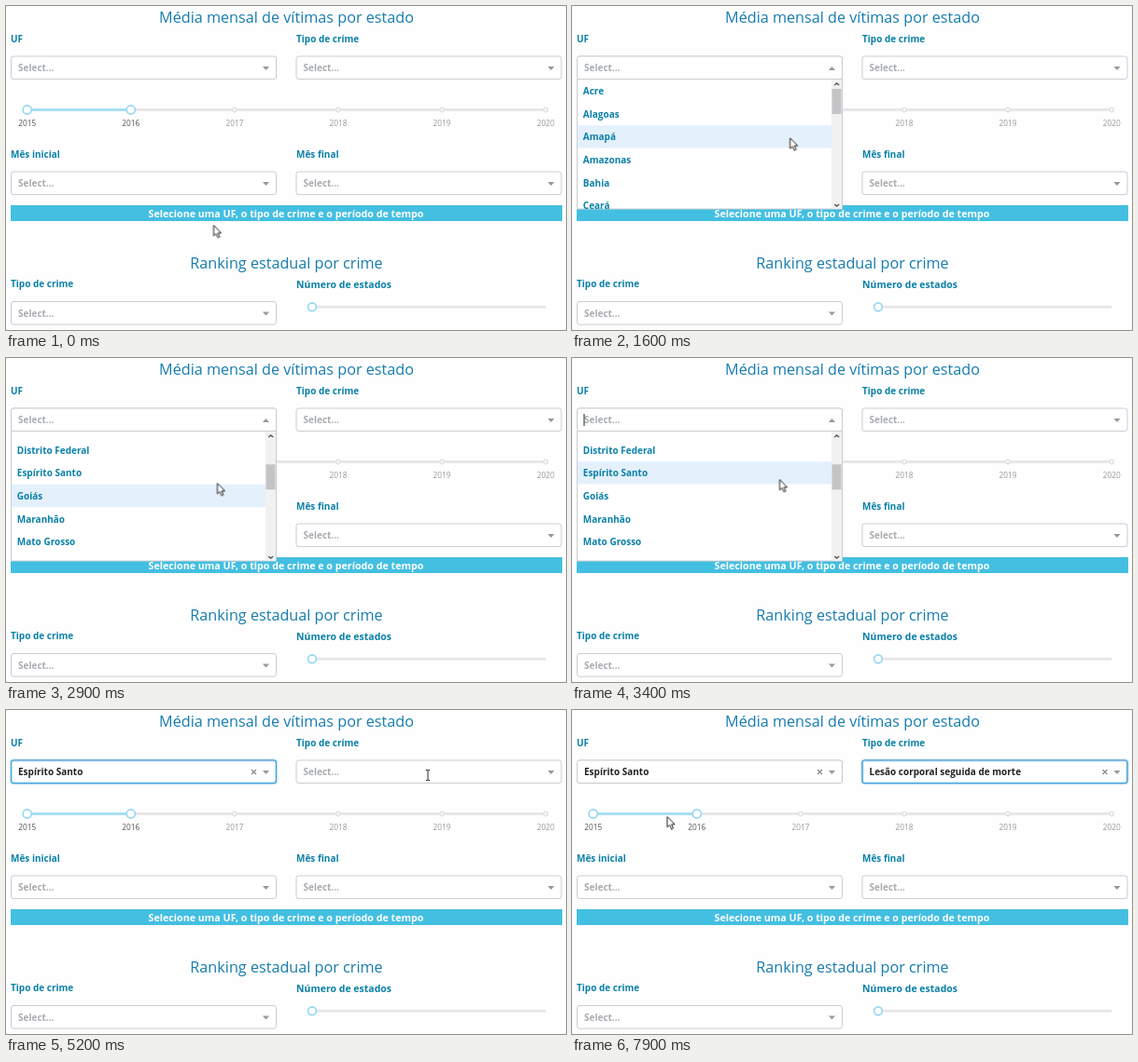
Write an HTML page that moves like this. It is 600x348 px and loops after 8 s.

```html
<!DOCTYPE html>
<html lang="pt-BR">
<head>
<meta charset="utf-8">
<title>Painel de vítimas por estado</title>
<style>
html, body { margin: 0; width: 100%; height: 100%; overflow: hidden; background: #fefefe; }
svg { display: block; width: 600px; height: 348px; }
text { font: 700 10px "Open Sans", "Noto Sans", sans-serif; fill: #0a80a8; }
.title { font-size: 16.2px; font-weight: 500; fill: #167caf; text-anchor: middle; }
.wide { font-size: 10.5px; }
.hint { fill: #a8acb0; }
.value { fill: #222; }
.year { font-size: 8.3px; font-weight: 400; fill: #999; text-anchor: middle; }
.year.on { fill: #555; }
.notice { font-size: 10.7px; fill: #fff; text-anchor: middle; }
.box { fill: #fff; stroke: #c9cdd1; }
.focus { fill: none; stroke: #3c9fdc; stroke-width: 1.2; }
.glow { fill: none; stroke: #3c9fdc; stroke-width: 4; opacity: .17; }
.tri { fill: #999; }
.row { fill: #e4f0fb; }
.rail { fill: #e7e7ea; }
.dot { fill: #fff; stroke: #e3e3e6; stroke-width: 1.6; }
.knob { fill: #fff; stroke: #96d8f2; stroke-width: 1.7; }

.anim { animation: 8s linear infinite; }
.cut { animation: 8s step-end infinite; }
#openL { animation-name: openL; }
#openR { animation-name: openR; }
#doneL { animation-name: doneL; }
#doneR { animation-name: doneR; }
#focusL { animation-name: focusL; }
#rowL { animation-name: rowL; }
#rowR { animation-name: rowR; }
#caretL { animation-name: caretL; }
#caretR { animation-name: caretR; }
#listL { animation-name: scroll; }
#thumb { animation-name: thumb; }
#pointer { animation-name: move; }
#arrow { animation-name: arrow; }
#beam { animation-name: beam; }

@keyframes openL { 0%, 45%, 100% { opacity: 0 } 12.5% { opacity: 1 } }
@keyframes openR { 0%, 81.25%, 100% { opacity: 0 } 65.9% { opacity: 1 } }
@keyframes doneL { 0% { opacity: 0 } 45%, 100% { opacity: 1 } }
@keyframes doneR { 0% { opacity: 0 } 81.25%, 100% { opacity: 1 } }
@keyframes focusL { 0%, 65.9%, 100% { opacity: 0 } 45% { opacity: 1 } }
@keyframes caretL { 0%, 25.75%, 39% { opacity: 1 } 19.1%, 32.4% { opacity: 0 } }
@keyframes caretR { 0%, 79.1% { opacity: 1 } 72.5% { opacity: 0 } }
@keyframes rowL {
  0% { transform: translateY(0) }
  15.25% { transform: translateY(24.6px) }
  18.1% { transform: translateY(49.2px) }
  26.9% { transform: translateY(196.8px) }
  37.5%, 100% { transform: translateY(172.2px) }
}
@keyframes rowR {
  0% { transform: translateY(0) }
  70.75%, 100% { transform: translateY(24.6px) }
}
@keyframes scroll {
  0%, 21.25% { transform: translateY(0) }
  23.1% { transform: translateY(-70px) }
  25% { transform: translateY(-120px) }
  26.25%, 100% { transform: translateY(-140px) }
}
@keyframes thumb {
  0%, 21.25% { transform: translateY(0) }
  23.1% { transform: translateY(12.6px) }
  25% { transform: translateY(21.7px) }
  26.25%, 100% { transform: translateY(25.3px) }
}
@keyframes move {
  0%, 1.25% { transform: translate(222.5px, 235.5px) }
  6.25% { transform: translate(236px, 170px) }
  10% { transform: translate(273px, 73px) }
  12.5% { transform: translate(272px, 78px) }
  17.5% { transform: translate(245px, 125px) }
  21.25% { transform: translate(228px, 150px) }
  25% { transform: translate(227.5px, 150.5px) }
  33.75% { transform: translate(227px, 136px) }
  36.25% { transform: translate(226.5px, 134.5px) }
  38.75% { transform: translate(224px, 132px) }
  42.5%, 43.75% { transform: translate(222.5px, 130.5px) }
  47.5%, 48.75% { transform: translate(300px, 97px) }
  52.5% { transform: translate(334.5px, 90.5px) }
  60%, 61.2% { transform: translate(326.5px, 90.5px) }
  61.25%, 62.5% { transform: translate(470px, 131px) }
  65% { transform: translate(452px, 70px) }
  66.25% { transform: translate(448px, 68px) }
  72.5%, 85% { transform: translate(412.5px, 118.5px) }
  96.25% { transform: translate(120px, 116px) }
  97.5% { transform: translate(104px, 115px) }
  98.75%, 100% { transform: translate(102px, 114.5px) }
}
@keyframes arrow { 0%, 13.5%, 67.5%, 100% { opacity: 1 } 9.5%, 64.1% { opacity: 0 } }
@keyframes beam { 0%, 13.5%, 67.5%, 100% { opacity: 0 } 9.5%, 64.1% { opacity: 1 } }
</style>
</head>
<body>
<svg id="stage" viewBox="0 0 600 348"></svg>
<script>
const LEFT = 5.5, RIGHT = 311, ROW = 24.6;
const states = ["Acre", "Alagoas", "Amapá", "Amazonas", "Bahia", "Ceará", "Distrito Federal",
  "Espírito Santo", "Goiás", "Maranhão", "Mato Grosso", "Mato Grosso do Sul", "Minas Gerais"];
const crimes = ["Homicídio doloso", "Lesão corporal seguida de morte",
  "Roubo seguido de morte (latrocínio)"];

const text = (x, y, s, cls = "") => `<text x="${x}" y="${y}" class="${cls}">${s}</text>`;
const rect = (x, y, w, h, attrs) => `<rect x="${x}" y="${y}" width="${w}" height="${h}" ${attrs}/>`;
const circle = (x, y, r, cls) => `<circle cx="${x}" cy="${y}" r="${r}" class="${cls}"/>`;
const group = (id, kind, body) => `<g id="${id}" class="${kind}">${body}</g>`;
const frame = (x, y, cls) => rect(x, y, 284, 24.6, `rx="2.5" class="${cls}"`);
const tri = (x, y, dir) => `<path class="tri" d="M${x - 3.6} ${y - 2 * dir}h7.2l-3.6 ${4 * dir}z"/>`;

const select = (x, y, label, dir = 1) =>
  frame(x, y, "box") + text(x + 7.5, y + 16.2, label, "hint") + tri(x + 273, y + 13, dir);

const chosen = (x, label) =>
  frame(x, 54, "box") + text(x + 7.5, 70.2, label, "value") + tri(x + 273, 67, 1) +
  `<path d="M${x + 257.5} 64l5 5m0-5l-5 5" stroke="#888" stroke-width="1.2"/>`;

const ring = x => frame(x, 54, "glow") + frame(x, 54, "focus");
const options = (x, list) => list.map((s, i) => text(x + 6.3, 95.2 + ROW * i, s)).join("");
const caret = (id, x) => group(id, "cut", rect(x + 7, 60, 1, 13, 'fill="#222"'));
const menuBox = (x, h) => rect(x, 78.6, 284, h, 'class="box"');
const hover = (id, x) => group(id, "cut", rect(x + .5, 79.1, 283, 24.2, 'class="row"'));
const chevron = (y, d) =>
  `<path d="M281.2 ${y + d}l2.5 ${-2 * d}l2.5 ${2 * d}" fill="none" stroke="#555" stroke-width="1.4"/>`;

function yearSlider() {
  let out = rect(22.5, 110, 556, 3, 'rx="1.5" class="rail"') + rect(22.5, 110, 111.5, 3, 'fill="#a9def2"');
  for (let i = 0; i < 6; i++) {
    const x = 22.7 + 111.1 * i;
    out += i < 2 ? circle(x, 111.5, 4.6, "knob") : circle(x, 111.5, 2.1, "dot");
    out += text(x, 129, 2015 + i, i < 2 ? "year on" : "year");
  }
  return out;
}

const page =
  text(300.5, 18.4, "Média mensal de vítimas por estado", "title") +
  text(5, 38.6, "UF") + text(311, 38.6, "Tipo de crime") +
  select(LEFT, 54, "Select...") + select(RIGHT, 54, "Select...") +
  yearSlider() +
  text(5, 162.8, "Mês inicial") + text(311, 162.8, "Mês final") +
  select(LEFT, 178, "Select...") + select(RIGHT, 178, "Select...") +
  rect(5, 214, 591, 17, 'fill="#43bfe2"') +
  text(300, 226.9, "Selecione uma UF, o tipo de crime e o período de tempo", "notice") +
  text(300.5, 281.6, "Ranking estadual por crime", "title") +
  text(5, 302, "Tipo de crime") + text(311, 302.8, "Número de estados", "wide") +
  select(LEFT, 317.5, "Select...") +
  rect(328, 321.7, 250.5, 3, 'rx="1.5" class="rail"') + circle(328, 323.2, 4.4, "knob");

const leftMenu = select(LEFT, 54, "Select...", -1) + caret("caretL", LEFT) + menuBox(LEFT, 139.4) +
  `<g clip-path="url(#view)">${group("listL", "anim", hover("rowL", LEFT) + options(LEFT, states))}</g>` +
  rect(278, 79.1, 11, 138.4, 'fill="#f1f1f1"') + chevron(84, 1) + chevron(214, -1) +
  group("thumb", "anim", rect(278.5, 89, 10, 27, 'fill="#c4c4c6"'));

const rightMenu = select(RIGHT, 54, "Select...", -1) + caret("caretR", RIGHT) + menuBox(RIGHT, 74.4) +
  hover("rowR", RIGHT) + options(RIGHT, crimes);

const pointer =
  group("arrow", "cut", '<path d="M0 0v11.4l2.6-2.4 1.9 4.3 2-.9-1.9-4.1h3.5z" fill="#fff" stroke="#222" stroke-width="1" stroke-linejoin="round"/>') +
  group("beam", "cut", '<path d="M-2.2-5.5h1.6l.6.6.6-.6h1.6M0-5v10M-2.2 5.5h1.6l.6-.6.6.6h1.6" fill="none" stroke="#222"/>');

document.getElementById("stage").innerHTML =
  `<clipPath id="view">${rect(6, 79.1, 283, 138.4, "")}</clipPath>` + page +
  group("doneL", "cut", chosen(LEFT, states[7])) +
  group("focusL", "cut", ring(LEFT)) +
  group("doneR", "cut", chosen(RIGHT, crimes[1]) + ring(RIGHT)) +
  group("openL", "cut", leftMenu) +
  group("openR", "cut", rightMenu) +
  group("pointer", "anim", pointer);
</script>
</body>
</html>
```
